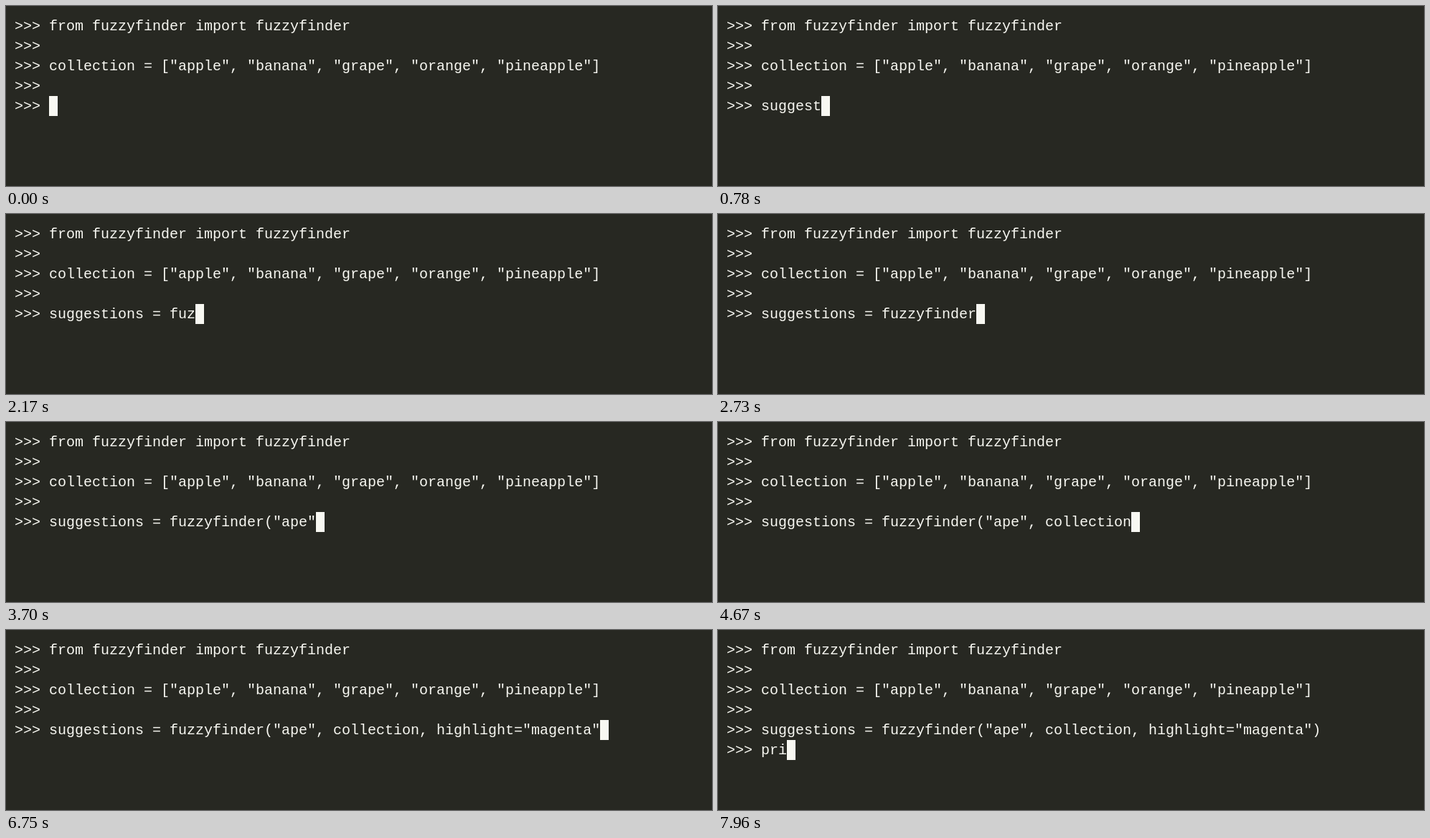
Animation of 984 by 252 pixels, one loop 8000 ms. Source, as an HTML page:

```html
<!DOCTYPE html>
<html lang="en">
<head>
<meta charset="utf-8">
<title>Fuzzy matching session</title>
<style>
  html, body { margin: 0; width: 100%; height: 100%; overflow: hidden; background: #272822; }
  svg { display: block; width: 984px; height: 252px; }
  text { font: 20px "Liberation Mono", monospace; fill: #f8f8f2; white-space: pre; }
  rect { fill: #f8f8f2; }
</style>
</head>
<body>
<svg viewBox="0 0 984 252"><rect id="cursor" width="12" height="28"/></svg>
<script>
const LOOP = 8000, CELL = 12, ROW = 28, TOP = 14, PROMPT = '>>> ';
const intro = [
  'from fuzzyfinder import fuzzyfinder',
  '',
  'collection = ["apple", "banana", "grape", "orange", "pineapple"]',
  ''
];
const command = 'suggestions = fuzzyfinder("ape", collection, highlight="magenta")';
const next = 'pri';
const ENTER = 7550;

// Typing bursts: first key, last key, number of steps, characters shown at the end
const commandBursts = [
  [400, 780, 7, 7], [840, 840, 1, 8], [880, 880, 1, 10], [1160, 1160, 1, 11],
  [1560, 1720, 3, 14], [1950, 2170, 3, 17], [2240, 2290, 2, 19],
  [2450, 2730, 6, 25], [2910, 3010, 2, 27], [3410, 3530, 3, 30],
  [3700, 3700, 1, 31], [3960, 4670, 12, 43], [5070, 5630, 9, 54],
  [5910, 6040, 2, 56], [6250, 6550, 5, 63], [6750, 6750, 1, 64], [7150, 7150, 1, 65]
];
const nextBursts = [[7850, 7960, 3, 3]];

function expand(bursts) {
  const keys = [];
  let shown = 0;
  for (const [start, end, steps, total] of bursts) {
    const gap = steps > 1 ? (end - start) / (steps - 1) : 0;
    for (let i = 0; i < steps; i++) {
      const count = shown + Math.round((total - shown) * (i + 1) / steps);
      keys.push({ at: Math.round((start + i * gap) / 10) * 10, count });
    }
    shown = total;
  }
  return keys;
}

const svg = document.querySelector('svg');
const cursor = document.getElementById('cursor');

function addLine(row, str) {
  const el = document.createElementNS('http://www.w3.org/2000/svg', 'text');
  el.setAttribute('x', CELL);
  el.setAttribute('y', TOP + row * ROW + 20);
  el.textContent = str;
  svg.append(el);
  return el;
}

function setText(el, str) {
  if (el.textContent !== str) el.textContent = str;
}

const typed = (keys, t) => keys.reduce((n, k) => (t >= k.at ? k.count : n), 0);

intro.forEach((str, row) => addLine(row, PROMPT + str));
const commandLine = addLine(4, PROMPT);
const nextLine = addLine(5, '');
const commandKeys = expand(commandBursts);
const nextKeys = expand(nextBursts);

function draw(t) {
  const entered = t >= ENTER;
  const n = typed(commandKeys, t);
  const m = typed(nextKeys, t);
  setText(commandLine, PROMPT + command.slice(0, n));
  setText(nextLine, entered ? PROMPT + next.slice(0, m) : '');
  cursor.setAttribute('x', CELL * (1 + PROMPT.length + (entered ? m : n)));
  cursor.setAttribute('y', TOP + ROW * (entered ? 5 : 4));
}

const origin = performance.now();
function tick() {
  draw((performance.now() - origin) % LOOP);
  requestAnimationFrame(tick);
}
draw(0);
requestAnimationFrame(tick);
</script>
</body>
</html>
```
